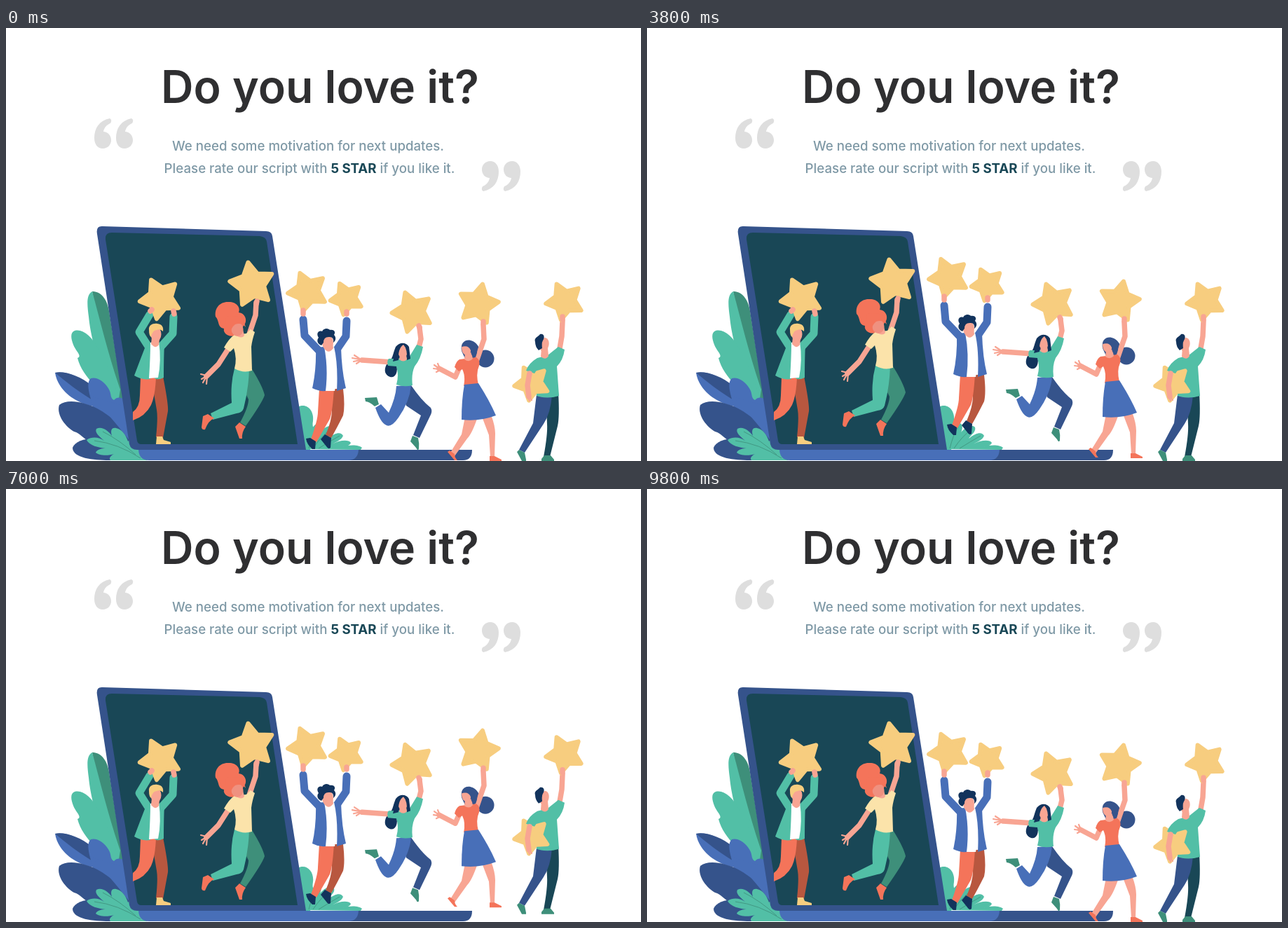
An HTML page for the animation above (9900 ms loop, 906 by 618 pixels).

```html
<!DOCTYPE html>
<html lang="en">
<head>
<meta charset="utf-8">
<title>Do you love it?</title>
<style>
html, body { margin: 0; width: 100%; height: 100%; overflow: hidden; background: #fff; }
svg { display: block; width: 906px; height: 618px; }
text { font-family: Inter, "Open Sans", sans-serif; text-anchor: middle; }
.title { font-size: 64.4px; font-weight: 600; fill: #2f2f31; }
.sub { font-size: 18.7px; font-weight: 500; fill: #7f99a6; }
.sub tspan { font-weight: 700; fill: #194756; }
.navy { fill: #35538b; }
.blue { fill: #486fb8; }
.ink { fill: #12335c; }
.teal { fill: #194756; }
.mint { fill: #52bfa6; }
.pine { fill: #3e8f7a; }
.skin { fill: #f8a593; }
.shade { fill: #ef9180; }
.red { fill: #f4745a; }
.rust { fill: #b8573f; }
.gold { fill: #f7cd7f; }
.cream { fill: #fbe3aa; }
.white { fill: #fff; }
.grey { fill: #dedede; }
.arm, .hand, .sleeve { fill: none; stroke: #f8a593; stroke-linecap: round; stroke-linejoin: round; }
.arm { stroke-width: 7.5; }
.hand { stroke-width: 2.2; }
.sleeve { stroke-width: 11; }
.onmint { stroke: #52bfa6; }
.onblue { stroke: #486fb8; }
.star { fill: #f7cd7f; stroke: #f7cd7f; stroke-width: 6; stroke-linejoin: round; }
.vein { fill: none; stroke: #3e8f7a; stroke-width: .8; }
</style>
</head>
<body>
<svg viewBox="0 0 906 618">
<defs>
  <path id="mark" d="M148 129C133 132 126 143 126 157C126 166 131 172 138 172C145 172 150 167 150 160C150 153 145 148 139 148C140 142 144 138 149 136Q152 131 148 129Z"/>
  <g id="quotes" class="grey"><use href="#mark"/><use href="#mark" x="31"/></g>
</defs>

<text class="title" x="448" y="107">Do you love it?</text>
<text class="sub" x="431" y="175">We need some motivation for next updates.</text>
<text class="sub" x="433" y="207">Please rate our script with <tspan>5 STAR</tspan> if you like it.</text>
<use href="#quotes"/>
<use href="#quotes" transform="rotate(180 430 181)"/>

<!-- plants -->
<path class="pine" d="M123 376C135 376 144 386 147 404L168 535L150 520Z"/>
<path class="mint" d="M123 376C114 381 116 396 118 412C121 442 131 484 160 535L163 516C147 470 135 420 123 376Z"/>
<path class="mint" d="M98 432C110 429 122 440 132 458C143 478 155 505 166 545L140 524C122 506 107 491 102 471C109 468 100 462 96 452C92 442 92 434 98 432Z"/>
<path class="blue" d="M70 492C84 489 106 497 124 513L160 556L125 540C98 535 74 517 70 492Z"/>
<path class="navy" d="M70 492C84 489 106 497 122 510L148 544C124 533 97 515 70 492Z"/>
<path class="blue" d="M121 500C131 497 143 507 148 518C150 523 149 529 154 531C160 525 167 527 174 536L188 600L160 572L126 548C122 530 112 508 121 500Z"/>
<path class="navy" d="M76 538C87 529 110 533 130 543C150 554 168 570 185 592L180 612L120 590C109 586 106 578 97 576C82 567 72 550 76 538Z"/>
<path class="blue" d="M121 525C138 542 156 563 178 591L184 598L170 540Z"/>
<path class="navy" d="M95 599C99 588 119 583 141 587L190 604V617H147C125 617 95 614 95 599Z"/>
<path class="mint" d="M115 588C124 582 134 585 140 589C133 583 126 577 129 572C137 568 146 575 151 582C149 575 150 570 157 571C166 573 171 581 174 590C177 586 183 587 185 592L202 617H149C146 614 150 610 154 608C145 611 132 610 128 606C130 601 137 600 142 600C132 599 119 596 115 588Z"/>
<path class="vein" d="M126 589Q160 593 192 614M138 576Q162 588 185 609"/>
<path class="mint" d="M416 541C429 534 440 546 438 561C436 571 441 572 440 579L434 602H420Z"/>
<path class="mint" d="M427 601C429 583 435 570 444 564C451 563 451 571 448 577C455 569 464 565 468 570C470 576 462 581 459 586C470 577 478 576 481 582C478 589 470 591 465 594C476 588 489 587 492 592C491 596 484 597 480 598C491 594 504 595 508 599L506 602Z"/>
<path class="vein" d="M432 600Q437 580 444 569M438 600Q450 582 463 573M446 600Q462 590 476 582"/>

<!-- laptop -->
<path class="navy" d="M488 602H665Q665 617 652 617H478Z"/>
<path class="blue" d="M189 602H503Q502 617 488 617H204Q190 617 189 602Z"/>
<path class="navy" d="M138 283L371 290Q379 290 380 297L428 602H187Q178 602 176 594L130 294Q128 282 138 283Z"/>
<path class="teal" d="M151 292L362 297Q371 298 372 305L416 594H193Q188 594 187 589L142 302Q141 292 151 292Z"/>

<!-- man in the screen -->
<g class="who">
  <path class="rust" d="M207 498L224 497Q232 538 231 547L224 585L214 584Q217 556 215 545Z"/>
  <path class="red" d="M192 498H214Q213 525 207 538Q199 554 181 560V548Q191 541 191 524Z"/>
  <path class="gold" d="M215 583H223L225 588L235 591V594H214Z"/>
  <path class="sleeve onmint" d="M205 409L190 434L204 456M239 412L238 436L221 455"/>
  <path class="star" data-star="220 386 29.5 -116"/>
  <path class="arm" d="M206 404L208 402M240 408L239 404"/>
  <path class="mint" d="M201 449L226 449Q225 472 225 499Q217 503 212 500L207 460L206 501Q194 503 183 496Q192 472 201 449Z"/>
  <path class="white" d="M206 449L218 447Q222 475 217 499L204 500Q206 470 206 449Z"/>
  <path class="skin" d="M208 441L219 444L218 452Q214 459 207 451Z"/>
  <ellipse class="skin" cx="214" cy="437" rx="7.5" ry="10.5"/>
  <path class="gold" d="M204 431C203 424 210 421 216 422C223 423 225 427 224 433Q220 429 215 431Q209 431 207 441Q204 439 204 431Z"/>
</g>

<!-- red-haired woman -->
<g class="who">
  <path class="pine" d="M338 488L351 487Q366 511 369 524Q366 534 342 568L334 563Q346 541 346 530L335 508Z"/>
  <path class="mint" d="M326 486L347 487Q346 516 339 543Q337 549 329 550L295 559L292 550L322 535Q320 508 326 486Z"/>
  <path class="red" d="M288 551L297 557Q289 560 284 573Q280 574 279 570L281 554ZM333 563L342 569Q336 577 337 586H333L327 569Z"/>
  <path class="red" d="M299 412C297 399 306 390 318 391C329 391 335 399 332 406C341 407 344 416 341 422L330 438C321 443 309 437 311 429C301 427 305 418 299 412Z"/>
  <path class="arm" d="M319 455L303 480L286 497M357 392L356 410L347 437"/>
  <path class="hand" d="M286 496L278 494M286 497L279 501M286 497L281 506M287 497L286 508"/>
  <path class="star" data-star="351 366 32 -100"/>
  <path class="arm" d="M358 390L357 394"/>
  <path class="cream" d="M326 438L343 436L349 430L355 434Q351 446 350 455L351 489Q338 493 326 486Q330 472 325 457L320 462L311 456Q319 442 326 438Z"/>
  <path class="skin" d="M328 432L338 430L340 439Q336 444 329 439Z"/>
  <ellipse class="shade" cx="330" cy="430" rx="8.5" ry="10"/>
  <path class="red" d="M314 412Q328 409 338 415L342 427Q336 420 327 423Q319 429 320 440L312 431Z"/>
</g>

<!-- man with two stars -->
<g class="who">
  <path class="rust" d="M465 515H481Q484 540 481 553Q472 571 464 585L456 581Q465 560 465 545Z"/>
  <path class="red" d="M447 514H468Q466 548 462 558L443 591L435 587Q445 559 445 548Z"/>
  <path class="ink" d="M434 585L442 590L441 601H437Q429 594 428 586ZM455 580L464 585L463 599Q460 602 457 597L449 587Z"/>
  <path class="sleeve onblue" d="M424 416L426 439L446 460M486 418L485 440L472 459"/>
  <path class="star" data-star="430.5 376 28.5 -113"/>
  <path class="star" data-star="486 386 23.5 -115"/>
  <path class="arm" d="M424 408L424 403M486 408L486 405"/>
  <path class="white" d="M451 456H472Q475 486 469 518H450Z"/>
  <path class="blue" d="M442 456L454 455Q460 486 456 518Q447 519 437 514Q443 488 442 456ZM468 455L478 456Q479 490 485 514L472 518Q474 480 468 455Z"/>
  <path class="skin" d="M454 447L466 450L467 457Q460 467 453 456Z"/>
  <ellipse class="skin" cx="459" cy="449" rx="8" ry="11"/>
  <path class="ink" d="M450 453C444 451 443 445 446 442C442 436 446 431 451 433C454 427 461 429 462 431C468 430 471 434 468 438C472 442 470 447 467 449Q468 441 462 441Q453 440 453 449Z"/>
</g>

<!-- leaping woman -->
<g class="who">
  <path class="navy" d="M561 511L578 510Q593 532 606 542Q609 547 605 554L590 585L581 581L592 553L571 539Z"/>
  <path class="blue" d="M557 511L578 510Q576 533 560 556Q549 572 541 566Q534 562 527 542L535 537L546 549Q556 528 557 511Z"/>
  <path class="pine" d="M512 528L529 527L532 537L526 540Q518 533 513 533ZM580 582L588 585Q590 593 589 601Q587 604 585 599L577 590Z"/>
  <path class="ink" d="M556 455C563 446 575 449 575 459L573 472L557 480C560 492 555 500 548 498C540 495 539 488 543 480C552 474 552 464 556 455Z"/>
  <path class="arm" d="M551 477L508 474M590 428L592 444L586 468"/>
  <path class="hand" d="M506 473L497 467M505 473L494 471M505 474L496 476M506 475L500 479"/>
  <path class="star" data-star="580 405 29.5 -111"/>
  <path class="arm" d="M590 427L589 425"/>
  <path class="mint" d="M557 472L575 470L586 452L595 455Q592 472 583 483Q578 494 580 510Q568 513 557 509Q561 495 557 483L545 482Q543 475 546 472Z"/>
  <path class="skin" d="M562 466L571 466L572 473Q567 478 561 473Z"/>
  <ellipse class="skin" cx="566" cy="461" rx="7" ry="10"/>
  <path class="ink" d="M556 460C558 449 570 447 575 455L577 472L572 474Q573 458 567 452Q559 457 560 474L552 476Z"/>
</g>

<!-- woman in a skirt -->
<g class="who">
  <path class="skin" d="M655 555H673Q665 579 658 586L640 611L634 606L650 580ZM678 552H692Q698 568 698 579L697 612H691L689 581Z"/>
  <path class="red" d="M633 603L640 608Q640 613 644 617H640L630 605ZM690 611H697L707 616V618H690Z"/>
  <circle class="navy" cx="684" cy="472" r="12.5"/>
  <path class="navy" d="M650 461C648 450 655 444 663 446C672 448 677 457 678 469L674 480L656 474Z"/>
  <path class="arm" d="M648 482L641 498L618 486M681 424L682 444L671 476"/>
  <path class="hand" d="M619 486L616 479M618 486L611 481M618 487L610 486M620 488L614 491"/>
  <path class="star" data-star="674 394 29 -78"/>
  <path class="arm" d="M681 422L681 419"/>
  <path class="red" d="M647 473L671 470Q677 474 675 482Q670 493 674 509L653 511Q656 497 651 487L646 490L640 484Q642 476 647 473Z"/>
  <path class="skin" d="M655 463L664 463L666 472Q661 478 654 473Z"/>
  <ellipse class="skin" cx="657" cy="457" rx="7" ry="10"/>
  <path class="navy" d="M650 455C651 445 663 443 670 451Q675 458 670 470Q663 469 663 460Q660 452 650 455Z"/>
  <path class="blue" d="M654 509L674 507Q690 532 699 553Q675 562 650 559Q650 530 654 509Z"/>
</g>

<!-- last man -->
<g class="who">
  <path class="teal" d="M770 520H788Q790 555 787 568L776 612H767Q773 580 772 565Z"/>
  <path class="navy" d="M757 523L779 524Q777 550 767 565L740 606L732 602L752 564Z"/>
  <path class="pine" d="M732 602L740 606L742 616V618H736L729 605ZM768 610H777L782 616V618H764V615Z"/>
  <path class="arm" d="M794 418L793 440L789 463"/>
  <path class="star" data-star="797 390 27 -115"/>
  <path class="arm" d="M794 416L794 412"/>
  <path class="mint" d="M758 471L773 467L788 455L797 459Q795 474 786 483L789 525Q772 530 757 525L757 492L750 494L742 489Q747 478 758 471Z"/>
  <path class="star" data-star="750 507 25 -117"/>
  <path class="mint" d="M757 472L766 475L754 493L742 489Q746 478 757 472Z"/>
  <path class="arm" d="M747 493L744 510L746 526"/>
  <path class="hand" d="M746 525L750 531M745 527L747 532"/>
  <path class="skin" d="M764 456L773 457L774 468Q770 475 763 469Z"/>
  <ellipse class="skin" cx="768" cy="452" rx="6.5" ry="10" transform="rotate(12 768 452)"/>
  <path class="ink" d="M755 448C753 442 759 441 762 437C768 436 769 441 766 446Q764 449 765 457L760 460Q755 455 755 448Z"/>
</g>
</svg>
<script>
// Five points around a centre, softened by a round-joined outline
for (const el of document.querySelectorAll("[data-star]")) {
  const [cx, cy, r, turn] = el.dataset.star.split(" ").map(Number);
  const points = Array.from({ length: 10 }, (_, i) => {
    const a = (turn + i * 36) * Math.PI / 180;
    const d = i % 2 ? r * 0.54 : r;
    return `${(cx + d * Math.cos(a)).toFixed(1)} ${(cy + d * Math.sin(a)).toFixed(1)}`;
  });
  el.setAttribute("d", `M${points.join("L")}Z`);
}

const LOOP = 9900;
const STEP = 100;

// Lift of each figure in px, as [step, lift]
const lifts = [
  [[0, 0], [10, 8], [20, 0]],
  [[0, 0], [20, 16], [40, 0]],
  [[10, 0], [40, 24], [60, 8], [80, 8], [91, 0]],
  [[20, 0], [50, 24], [70, 8], [80, 8], [91, 0]],
  [[30, 0], [60, 24], [70, 16], [80, 2], [91, 0]],
  [[50, 0], [80, 24], [91, 0]]
];
const people = [...document.querySelectorAll(".who")];

// Every eleventh tick rests, until tick 72
function stepAt(ms) {
  const n = Math.floor((ms % LOOP) / STEP);
  return n < 6 ? n : n - 1 - Math.floor((Math.min(n, 72) - 6) / 11);
}

function liftAt(keys, k) {
  if (k <= keys[0][0]) return keys[0][1];
  for (let i = 1; i < keys.length; i++) {
    const [a, from] = keys[i - 1], [b, to] = keys[i];
    if (k <= b) return from + (to - from) * (k - a) / (b - a);
  }
  return keys[keys.length - 1][1];
}

const start = performance.now();
function draw() {
  const k = stepAt(performance.now() - start);
  people.forEach((el, i) => {
    el.setAttribute("transform", `translate(0 ${-liftAt(lifts[i], k)})`);
  });
  requestAnimationFrame(draw);
}
draw();
</script>
</body>
</html>
```
